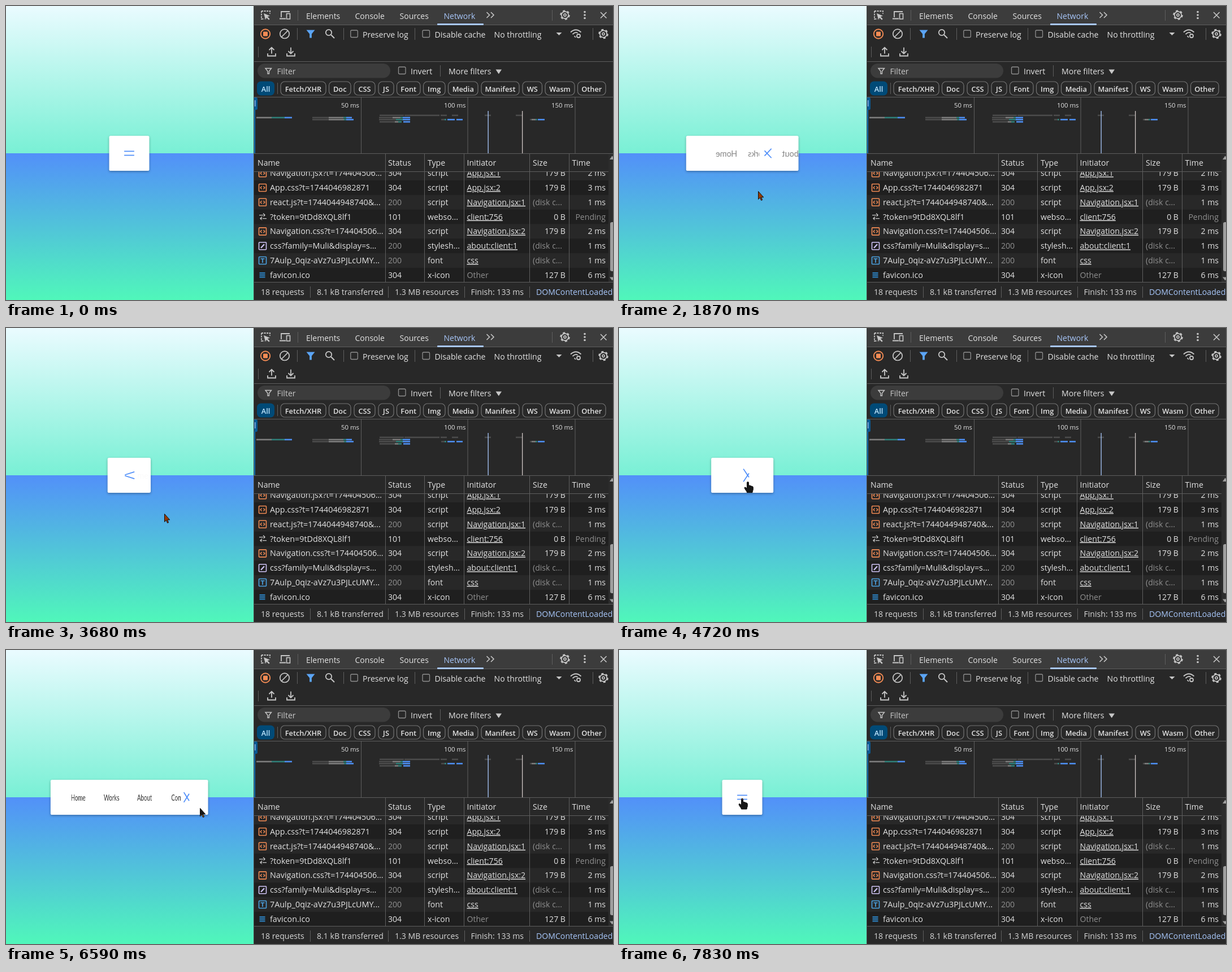
These frames come from a looping animation (1074 by 521 pixels, 8000 ms). An HTML page:

```html
<!DOCTYPE html>
<html lang="en">
<head>
<meta charset="utf-8">
<title>Animated navigation</title>
<style>
* { box-sizing: border-box; }
html, body { margin: 0; width: 100%; height: 100%; overflow: hidden; background: #282828; }
#page {
  position: absolute; left: 0; top: 0; width: 438px; height: 521px;
  background: linear-gradient(#eafbff, #79f0d5 50%, #5290f9 50%, #50f7ba);
}
nav {
  position: absolute; left: 218.3px; top: 261px;
  width: calc(80px + 270px * var(--p)); height: 70px; padding: 20px;
  display: flex; align-items: center; justify-content: center; overflow: hidden;
  background: #fff; border-radius: 3px; box-shadow: 0 2px 5px rgba(0, 0, 0, .3);
  transform: translate(-50%, -50%) scale(.8875);
  font: 16.4px Lato, sans-serif; color: #111;
}
ul { display: flex; list-style: none; margin: 0; padding: 0; width: calc(100% * var(--p)); }
li { flex: none; padding: 0 10px; opacity: var(--p); transform: rotateY(calc(360deg * var(--p))); }
#icon { position: relative; width: 30px; height: 30px; background: #fff; }
#icon i { position: absolute; left: 5px; top: 10px; width: 20px; height: 2px; background: #5290f9; }
#icon i:first-child { transform: rotate(calc(-765deg * var(--p))) translateY(calc(5.5px * var(--p))); }
#icon i:last-child { top: 18px; transform: rotate(calc(765deg * var(--p))) translateY(calc(-5.5px * var(--p))); }
svg { position: absolute; left: 0; top: 0; }
#tools { font: 14.1px "Open Sans", "Noto Sans", sans-serif; }
#ink { mix-blend-mode: difference; }
</style>
</head>
<body>
<div id="page"></div>
<nav>
  <ul>
    <li style="width:64.4px">Home</li><li style="width:67.4px">Works</li>
    <li style="width:65.4px">About</li><li>Contact</li>
  </ul>
  <div id="icon"><i></i><i></i></div>
</nav>
<svg id="tools" width="1074" height="521"></svg>
<svg id="ink" width="1074" height="521"><path fill="#e8e8e8"/></svg>
<svg id="edge" width="1074" height="521"><path fill="none" stroke="#111" stroke-linejoin="round"/></svg>
<script>
const LIGHT = '#e3e3e3', ICON = '#c7c7c7', DIM = '#8f8f8f', RULE = '#5e5e5e', BLUE = '#4c8df0';

// --- Developer tools panel ---
const rect = (x, y, w, h, fill, more = '') =>
  `<rect x="${x}" y="${y}" width="${w}" height="${h}" fill="${fill}" ${more}/>`;
const stroke = (d, color = ICON, width = 1.6, more = '') =>
  `<path d="${d}" fill="none" stroke="${color}" stroke-width="${width}" ${more}/>`;
const solid = (d, fill = ICON) => `<path d="${d}" fill="${fill}"/>`;
const text = (x, y, s, fill = LIGHT, more = '') =>
  `<text x="${x}" y="${y}" fill="${fill}" ${more}>${s}</text>`;
const ring = (x, y, r, color = ICON, width = 1.6, more = '') =>
  `<circle cx="${x}" cy="${y}" r="${r}" fill="none" stroke="${color}" stroke-width="${width}" ${more}/>`;
const hline = y => rect(439, y, 635, 1, RULE);
const vline = (x, y, h) => rect(x, y, 1, h, RULE);
const box = (x, y) => rect(x, y, 12.5, 12.5, 'none', `rx="2" stroke="${DIM}" stroke-width="1.3"`);
const END = 'text-anchor="end"';

const gear = (x, y) => `<g transform="translate(${x} ${y})">` +
  ring(0, 0, 6.2, ICON, 1.7) + ring(0, 0, 7.7, ICON, 2.2, 'stroke-dasharray="4 4.06"') + ring(0, 0, 2.1) + '</g>';

function tabBar() {
  const tabs = [[531, 'Elements'], [617.5, 'Console'], [696.5, 'Sources'], [774.5, 'Network', '#a8c7fa']];
  return rect(439, 0, 635, 33, '#3c3c3c') + hline(33) +
    stroke('M452 9H467V14M452 9V23H457', ICON, 1.8, 'stroke-dasharray="3 1.6"') +
    solid('M456 13l11 4.5-4.3 1.6 4 4-1.7 1.6-4-4-1.8 3.8z') +
    stroke('M487 20V10H502M484 22.5H495', ICON, 1.8) + rect(496.5, 13.5, 6, 9.5, 'none', `stroke="${ICON}" stroke-width="1.6"`) +
    vline(516, 7, 19) + vline(966, 7, 19) +
    tabs.map(([x, s, c]) => text(x, 23, s, c, 'font-weight="500" font-size="14"')).join('') +
    rect(763, 31, 82, 3, '#a8c7fa', 'rx="1"') +
    stroke('M850.5 11l5 5-5 5M858 11l5 5-5 5') + gear(989, 16) +
    [10.5, 16, 21.5].map(y => `<circle cx="1024" cy="${y}" r="1.8" fill="${ICON}"/>`).join('') +
    stroke('M1052 11l10.5 10.5M1062.5 11l-10.5 10.5');
}

function toolbars() {
  const tray = (x, tip) => stroke(`M${x - 7} 84v4.5h14v-4.5M${x} 73.5v11` + tip, ICON, 1.8);
  return ring(459, 49.5, 8.2, '#f28b54', 1.9) + rect(455, 45.5, 8, 8, '#f28b54', 'rx="1"') +
    ring(493, 49.3, 8.2, ICON, 1.7) + stroke('M487.5 55L498.7 43.6', ICON, 1.7) +
    solid('M531.5 42.5h15l-5.6 7v7h-3.8v-7z', '#5ba4f5') +
    ring(571, 47, 5.2, ICON, 1.8) + stroke('M575 51l6 6', ICON, 2) +
    [515, 597, 723, 1038].map(x => vline(x, 39, 21)).join('') +
    box(609.8, 43) + text(631, 55.5, 'Preserve log') + box(737, 43) + text(758.5, 55.5, 'Disable cache') +
    text(863.5, 55.5, 'No throttling') + solid('M973.5 47h10l-5 5z') +
    stroke('M999 46.5q9-8.5 18.5 0M1002.5 50q5.5-5 9-2M1005.5 53.2l2.5 2.5', ICON, 1.8) + ring(1013, 53, 3, ICON, 1.8) +
    gear(1057, 49.5) + vline(446, 72, 19) +
    tray(470, 'M465.5 78l4.5-4.5 4.5 4.5') + tray(504, 'M499.5 80l4.5 4.5 4.5-4.5') + hline(98) +
    rect(445, 102, 235, 25.5, '#3c3c3c', 'rx="12.7"') +
    stroke('M459 110.5h10.5l-4 5v4.5h-2.5v-4.5z', ICON, 1.4) + text(479.5, 120.5, 'Filter', ICON) +
    box(694.5, 108) + text(716, 120.5, 'Invert') + vline(768, 105, 20) +
    text(783, 120.5, 'More filters') + solid('M866.5 112.5h10.5l-5.25 8z');
}

function chips() {
  const list = [['Fetch/XHR', 486, 566], ['Doc', 571.5, 610], ['CSS', 616, 653], ['JS', 659, 686], ['Font', 691.5, 733],
    ['Img', 738.5, 777], ['Media', 782.5, 835], ['Manifest', 841, 908], ['WS', 914, 948.5], ['Wasm', 954, 1006], ['Other', 1011.5, 1061]];
  const label = (x, s, c) => text(x, 151.5, s, c, 'text-anchor="middle" font-weight="600" font-size="12.8"');
  return rect(444, 133.5, 31, 25, '#004a77', 'rx="7"') + label(459.5, 'All', '#c2e7ff') + vline(480, 136, 20) +
    list.map(([s, a, b]) => rect(a, 134, b - a, 24, 'none', 'rx="7" stroke="#757575" stroke-width="1.2"') +
      label((a + b) / 2, s, LIGHT)).join('');
}

function timeline() {
  const tones = { d: '#4b4b4b', g: '#7d7d7d', t: '#2f7f78', b: BLUE };
  // Each line: y, start, then a tone and an end per segment ("-" leaves a gap).
  const bars = [
    '196.5 443 g470 t493 b506', '196.5 542 d571 g597 t602 b612', '200 542 d571 g598 t602 b615',
    '192.5 661 d704 -705 d767 -769 d780 -789 d800 -847 d858 -902 d913', '196.5 660 d684 g698 t702 b715',
    '200 660 d690 t702 b715', '204 661 d688 g694 t700 -703 b715',
    '200 770 d776 t779 -781 b794 -797 b808', '200 927 d930 g937 t940 -941 b953'];
  const drawBar = line => {
    let [y, x, ...parts] = line.split(' ');
    return parts.map(part => {
      const end = +part.slice(1), out = part[0] === '-' ? '' : rect(x, y, end - x, 2.6, tones[part[0]]);
      x = end;
      return out;
    }).join('');
  };
  return hline(161) + hline(261) +
    [[628, '50 ms'], [816.5, '100 ms'], [1006.5, '150 ms']].map(([x, s]) =>
      vline(x, 162, 99) + text(x - 3, 179.5, s, LIGHT, END + ' font-size="11.4"')).join('') +
    bars.map(drawBar).join('') +
    rect(852.5, 186, 1.3, 75, '#a8c7fa') + rect(913, 186, 1.3, 75, '#d0c8c5') +
    rect(439, 162, 2, 99, '#0f6fb0') +
    rect(439, 162, 6, 22, '#0b5a92', 'rx="2.5"') + rect(440, 167, 1.3, 11, '#a8c7fa');
}

function requests() {
  const frame = c => rect(447.5, -6.5, 13, 13, 'none', `rx="1" stroke="${c}" stroke-width="1.6"`);
  const icons = {
    script: frame('#f28b54') + stroke('M452.6-2.5l-2.5 2.5 2.5 2.5M455.4-2.5l2.5 2.5-2.5 2.5', '#f28b54', 1.4),
    socket: stroke('M448-3h10M455-6l3 3-3 3M461 3h-10M453 0l-3 3 3 3', ICON, 1.4, 'stroke-dasharray="7 1"'),
    style: frame('#cfc3f5') + stroke('M451 3.5l6-6.5', '#cfc3f5', 2.2),
    font: frame('#4ba3e3') + stroke('M450.5-3h7M454-3v7', '#4ba3e3', 1.7),
    image: [-4, -1.3, 1.4, 4].map(y => rect(448.5, y - .8, 10, 1.5, '#2f8fd8')).join('')
  };
  const rows = [
    ['script', 'Navigation.jsx?t=174404506...', 304, 'script', 'App.jsx:1', '179 B', '2 ms'],
    ['script', 'App.css?t=1744046982871', 304, 'script', 'App.jsx:2', '179 B', '3 ms'],
    ['script', 'react.js?t=1744044948740&amp;...', 200, 'script', 'Navigation.jsx:1', '', '1 ms'],
    ['socket', '?token=9tDd8XQL8lf1', 101, 'webso...', 'client:756', '0 B', 'Pending'],
    ['script', 'Navigation.css?t=174404506...', 304, 'script', 'Navigation.jsx:2', '179 B', '2 ms'],
    ['style', 'css?family=Muli&amp;display=s...', 200, 'stylesh...', 'about:client:1', '', '1 ms'],
    ['font', '7Aulp_0qiz-aVz7u3PJLcUMY...', 200, 'font', 'css', '', '1 ms'],
    ['image', 'favicon.ico', 304, 'x-icon', 'Other', '127 B', '6 ms']];
  const drawRow = ([icon, name, status, type, from, size, time], i) =>
    `<g transform="translate(0 ${296.2 + 25.8 * i})">` +
    rect(439, -12.9, 630, 25.9, i % 2 ? '#1f1f1f' : '#282828') + icons[icon] +
    text(467, 5, name, LIGHT, 'font-size="14.35"') + text(676, 5, status, status === 200 ? DIM : LIGHT) + text(746, 5, type) +
    text(815.5, 5, from, from === 'Other' ? DIM : LIGHT, from === 'Other' ? '' : 'text-decoration="underline"') +
    (size ? text(990, 5, size, LIGHT, END) : text(932, 5, '(disk c...', DIM)) +
    text(1061, 5, time, time === 'Pending' ? DIM : LIGHT, END) + '</g>';
  const heads = [[445, 'Name'], [676, 'Status'], [746, 'Type'], [815.5, 'Initiator'], [932, 'Size'], [1001.5, 'Time']];
  return '<clipPath id="list"><path d="M439 294H1074V489H439z"/></clipPath>' +
    `<g clip-path="url(#list)">${rows.map(drawRow).join('')}</g>` +
    heads.map(([x, s]) => text(x, 283, s)).join('') + hline(293) +
    [671, 740, 810, 926, 996].map(x => vline(x, 262, 227)).join('') +
    rect(1066, 262, 8, 227, '#2c2c2c') + rect(1069, 383, 8, 87, '#9f9f9f', 'rx="3"') +
    solid('M1068 272l4.5-6.5 4.5 6.5zM1068 480.5h9l-4.5 6z', '#9f9f9f');
}

function summary() {
  const items = [[451, '18 requests'], [550, '8.1 kB transferred'], [688, '1.3 MB resources'],
    [822.5, 'Finish: 133 ms'], [938, 'DOMContentLoaded', '#a8c7fa']];
  return rect(439, 489, 635, 32, '#282828') + hline(489) +
    items.map(([x, s, c = '#d6d6d6']) => text(x, 512, s, c)).join('') +
    [538, 676, 811, 926].map(x => vline(x, 497, 20)).join('');
}

document.getElementById('tools').innerHTML = rect(438, 0, 636, 521, '#282828') +
  tabBar() + toolbars() + chips() + timeline() + requests() + summary() + rect(438, 0, 1, 521, '#4a4a4a');

// --- Motion ---
const LOOP = 8000, TOGGLE = 600;
const clicks = [1552, 3095, 4624, 6510];
// Pointer stops: time, x, y
const stops = [
  [260, 524, 462], [1020, 235, 283], [1080, 235, 283], [1300, 221, 264], [1560, 222, 264], [1870, 246, 328],
  [1960, 246, 328], [2520, 352, 250], [2810, 352, 250], [3130, 350, 256], [3400, 342, 361], [3550, 315, 357],
  [3680, 280, 329], [4080, 221, 263], [4640, 222, 264], [5130, 304, 382], [5420, 304, 382], [6150, 343, 265],
  [6510, 343, 265], [6590, 343, 280], [7000, 274, 382], [7120, 270, 380], [7750, 218, 263], [8000, 218, 263]];
const ARROW = 'M.5 .5V14.6L3.5 11.7 5.6 16.5 7.6 15.7 5.6 10.9H9.8z';
const HAND = 'M-1.5 1Q0-1 1.5 1V6.5Q3 5.5 4 7 5.5 6.3 6.5 7.8 8.5 7.2 9.3 9.5V14Q8.5 16 8 19H-1.5' +
  'Q-2 16.5-4 14.5L-6 11Q-6 8.5-3.5 10L-1.5 12z';

const clamp = v => Math.min(1, Math.max(0, v));
const openness = t => clicks.reduce((p, start, i) => p + (i % 2 ? -1 : 1) * clamp((t - start) / TOGGLE), 0);

function pointerAt(t) {
  const i = Math.max(1, stops.findIndex(s => s[0] > t));
  const [t0, x0, y0] = stops[i - 1], [t1, x1, y1] = stops[i];
  const k = clamp((t - t0) / (t1 - t0)), e = k * k * (3 - 2 * k);
  return [x0 + (x1 - x0) * e, y0 + (y1 - y0) * e];
}

const nav = document.querySelector('nav'), icon = document.getElementById('icon');
const pointers = document.querySelectorAll('#ink path, #edge path');

function draw(now) {
  const t = now % LOOP, [x, y] = pointerAt(t);
  nav.style.setProperty('--p', openness(t).toFixed(4));
  const r = icon.getBoundingClientRect();
  const over = x >= r.left && x <= r.right && y >= r.top && y <= r.bottom;
  for (const path of pointers) {
    path.setAttribute('d', over ? HAND : ARROW);
    path.setAttribute('transform', `translate(${x} ${y})`);
    path.setAttribute('visibility', t < stops[0][0] ? 'hidden' : 'visible');
  }
}

const began = performance.now();
function tick() {
  draw(performance.now() - began);
  requestAnimationFrame(tick);
}
tick();
</script>
</body>
</html>
```
